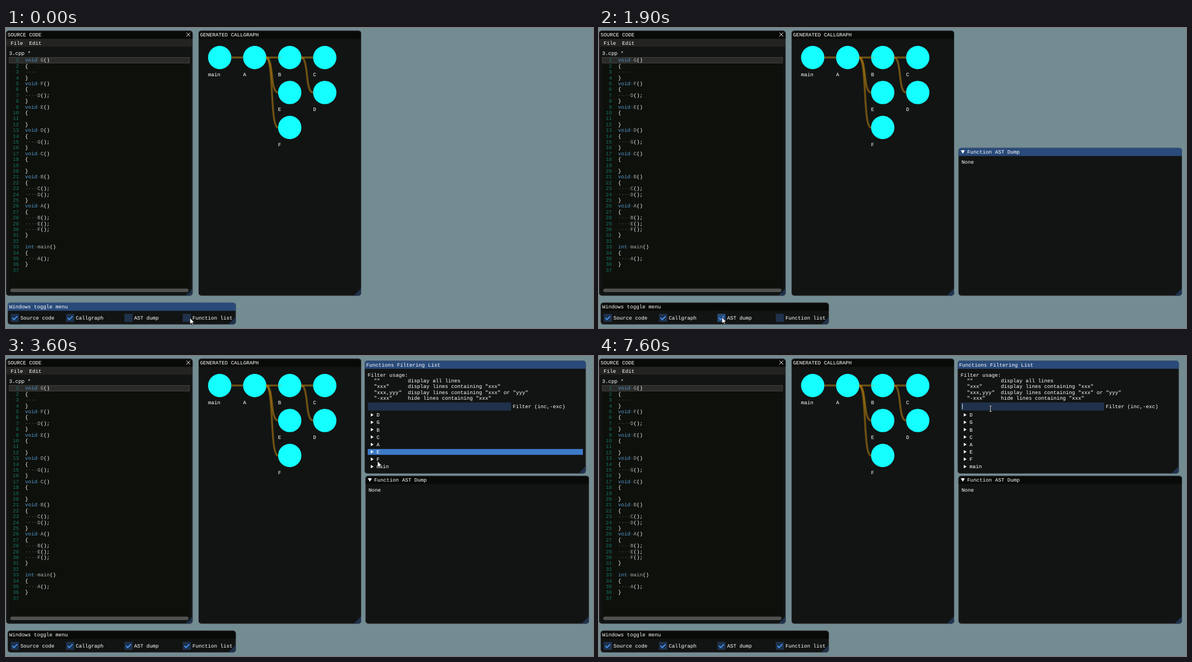
Recreate the animation shown at these times as an HTML page. Size 1046 px wide and 535 px high, loop 8 s.

```html
<!DOCTYPE html>
<html lang="en">
<head>
<meta charset="utf-8">
<title>Callgraph viewer</title>
<style>
html, body { margin: 0; width: 100%; height: 100%; overflow: hidden; background: #738c92; }
svg { display: block; width: 100%; height: 100%; }
text {
  font: 9.18px "Liberation Mono", monospace;
  fill: #fff;
  white-space: pre;
  text-rendering: geometricPrecision;
}
</style>
</head>
<body>
<svg id="stage" viewBox="0 0 1046 535"></svg>
<script>
const LOOP = 8000, STEP = 100;
const LINE = 10.4, CHAR = 5.508, TREE = 13.17;
const BG = '#121413', TITLE = '#080a07', TITLE_ON = '#294a7a';
const FRAME = '#1f314b', FRAME_ON = '#284c79', HOVER = '#3c7bc8';
const stage = document.getElementById('stage');

function add(parent, tag, attrs = {}, content) {
  const el = document.createElementNS('http://www.w3.org/2000/svg', tag);
  for (const k in attrs) el.setAttribute(k, attrs[k]);
  if (content !== undefined) el.textContent = content;
  parent.appendChild(el);
  return el;
}
const rect = (p, x, y, width, height, fill, more) =>
  add(p, 'rect', { x, y, width, height, fill, ...more });
const path = (p, d, fill, more) => add(p, 'path', { d, fill, ...more });
// y is the middle of the capital letters
const label = (p, x, y, str, more) => add(p, 'text', { x, y: y + 3, ...more }, str);
const show = (el, on) => el.setAttribute('visibility', on ? 'visible' : 'hidden');

// A panel with title bar, border and resize grip
function panel(x, y, w, h, title, indent = 2.8) {
  const g = add(stage, 'g'), r = 5, x2 = x + w, y2 = y + h;
  rect(g, x, y, w, h, BG, { rx: r });
  const bar = path(g, `M${x} ${y + 14.5}v${r - 14.5}a${r} ${r} 0 0 1 ${r} ${-r}H${x2 - r}a${r} ${r} 0 0 1 ${r} ${r}v${14.5 - r}z`, TITLE);
  path(g, `M${x2 - 13.5} ${y2}L${x2} ${y2 - 13.5}V${y2 - r}a${r} ${r} 0 0 1 ${-r} ${r}z`, FRAME);
  rect(g, x + .35, y + .35, w - .7, h - .7, 'none', { rx: r, stroke: '#6e6e80', 'stroke-opacity': .5, 'stroke-width': .7 });
  label(g, x + indent, y + 7.3, title);
  return { g, bar };
}

function buildSource() {
  const { g } = panel(0, 4.7, 332.6, 472.8, 'SOURCE CODE');
  path(g, 'M321.6 8.4l6.6 6.6m0 -6.6l-6.6 6.6', 'none', { stroke: '#fff', 'stroke-width': 1 });
  rect(g, .7, 19.3, 331.2, 14, '#232422');
  label(g, 8.3, 26.6, 'File');
  label(g, 41.2, 26.6, 'Edit');
  label(g, 5.5, 44.6, '3.cpp *');
  rect(g, 5.5, 52, 321.6, 420, '#0e100b');
  rect(g, 5.8, 52.4, 321.2, 10.2, '#2a2b29', { stroke: '#535452', 'stroke-width': .7 });
  rect(g, 7.5, 464.8, 317.8, 6.2, '#505150', { rx: 3 });

  const fn = (name, ...body) => [`void ${name}()`, '{', ...body, '}'];
  const call = name => `    ${name}();`;
  const code = [
    ...fn('G', '    '), ...fn('F', call('D')), ...fn('E', ''), ...fn('D', call('G')), ...fn('C', ''),
    ...fn('B', call('C'), call('D')), ...fn('A', call('B'), call('E'), call('F')),
    '', 'int main()', '{', call('A'), '}', ''
  ];
  code.forEach((src, i) => {
    const y = 57.4 + i * LINE;
    label(g, 23, y, i + 1, { 'text-anchor': 'end', style: 'fill:#14766c' });
    for (const m of src.matchAll(/\w+| |[^\w ]+/g)) {
      const x = 34 + m.index * CHAR, word = m[0];
      if (word === ' ') {
        path(g, `M${x + 1.9} ${y + .4}l.9 -.9l.9 .9l-.9 .9z`, '#585a56');
        continue;
      }
      const fill = /^(void|int)$/.test(word) ? '#569cd6' : /\w/.test(word) ? '#aaa' : '#fff';
      label(g, x, y, word, { style: `fill:${fill}` });
    }
  });
}

function buildGraph() {
  const { g } = panel(343, 4.7, 290, 472.8, 'GENERATED CALLGRAPH');
  const R = 20.8, GAP = 62.4;
  const nodes = { main: [0, 0], A: [1, 0], B: [2, 0], C: [3, 0], E: [2, 1], D: [3, 1], F: [2, 2] };
  const at = name => nodes[name].map((n, i) => [380.8, 52.6][i] + n * GAP);
  for (const name in nodes) {
    const [cx, cy] = at(name);
    add(g, 'circle', { cx, cy, r: R, fill: '#14ffff' });
    label(g, cx - R, cy + 30.1, name);
  }
  const brown = { stroke: '#c88c14', 'stroke-opacity': .5, 'stroke-width': 3.5 };
  for (const [a, b] of ['main A', 'A B', 'A E', 'A F', 'B C', 'B D'].map(s => s.split(' '))) {
    const [x1, y1] = at(a), [x2, y2] = at(b), bend = 15;
    const s = x1 + R - (y1 === y2 ? 0 : 1), e = x2 - R;
    path(g, `M${s} ${y1}C${s + bend} ${y1} ${e - bend} ${y2} ${e} ${y2}`, 'none', brown);
  }
  path(g, 'M485 52.6h6', 'none', { ...brown, 'stroke-width': 1.5 });
}

function buildToggles() {
  const { g, bar } = panel(2.9, 489.7, 406.7, 39, 'Windows toggle menu');
  const boxes = [[8.5, 'Source code'], [107, 'Callgraph'], [211, 'AST dump'], [315, 'Function list']].map(([x, name]) => {
    const box = rect(g, x, 509.7, 14.5, 14.5, FRAME);
    const tick = path(g, `M${x + 2.9} 517l2.9 2.9l5.8 -5.8`, 'none', { stroke: '#4296fa', 'stroke-width': 1.95 });
    label(g, x + 17.3, 517.2, name);
    return { box, tick };
  });
  return { bar, boxes };
}

function buildDump() {
  const win = panel(640.5, 213.7, 398.4, 263.8, 'Function AST Dump', 15.6);
  path(win.g, 'M644.7 218h7.2l-3.6 6.2z', '#fff');
  label(win.g, 646, 239.4, 'None');
  return win;
}

function buildList() {
  const win = panel(639, 8.2, 394.3, 201.5, 'Functions Filtering List'), { g } = win;
  const usage = [['""', 'all'], ['"xxx"', '"xxx"'], ['"xxx,yyy"', '"xxx" or "yyy"'], ['"-xxx"', '"xxx"']];
  label(g, 644.6, 33.6, 'Filter usage:');
  usage.forEach(([key, what], i) => {
    const verb = i === 3 ? 'hide' : 'display', y = 44 + i * LINE;
    label(g, 655.6, y, key);
    label(g, 716.1, y, i ? `${verb} lines containing ${what}` : 'display all lines');
  });
  rect(g, 644.6, 82.8, 255.5, 14.5, FRAME);
  label(g, 903, 90.2, 'Filter (inc,-exc)');
  win.caret = rect(g, 647.2, 85, .9, 9.8, '#fff');
  win.row = rect(g, 644.6, 0, 383.4, 10.4, HOVER);
  ['D', 'G', 'B', 'C', 'A', 'E', 'F', 'main'].forEach((name, i) => {
    const y = 105.2 + i * TREE;
    path(g, `M650 ${y - 3.2}v6l5 -3z`, '#fff');
    label(g, 660.2, y, name);
  });
  return win;
}

rect(stage, 0, 0, 1046, 535, '#738c92');
buildSource();
buildGraph();
const toggles = buildToggles(), dump = buildDump(), list = buildList();
const edge = { stroke: '#000', 'stroke-width': .7 };
const arrow = path(stage, 'M0 0V11.2L2.6 8.8L4.3 12.8L6 12L4.3 8.2H7.8z', '#fff', edge);
const beam = add(stage, 'g');
for (const [stroke, w] of [['#000', 2], ['#fff', .9]])
  path(beam, 'M-2 -4.8H2M0 -4.8V4.8M-2 4.8H2', 'none', { stroke, 'stroke-width': w });

// Pointer stops: time, x, y
const stops = [
  [0, 327.8, 517], [400, 325.5, 517], [500, 324.2, 517], [900, 322.6, 517],
  [1100, 308, 517], [1200, 272, 517], [1300, 244.5, 517], [1500, 232, 516.5],
  [1600, 222, 516], [1700, 219, 515.8],
  [2200, 240, 516], [2300, 295, 516.5], [2400, 322.8, 516.8],
  [3100, 331, 508], [3200, 385, 445], [3300, 470, 355], [3400, 560, 270],
  [3500, 625, 215], [3600, 662, 187.4], [3700, 682, 168], [3800, 696, 154], [3900, 702.5, 147],
  [4100, 701.5, 132], [4200, 700.5, 117], [4300, 699, 105], [4400, 698, 96], [4500, 697.8, 94.8], [4700, 697.6, 94]
];
const within = (t, a, b) => t >= a && t < b;

function draw(now) {
  const t = Math.floor(now % LOOP / STEP) * STEP;
  const [, x, y] = stops.findLast(s => s[0] <= t);
  const typing = t >= 4300;
  show(arrow, !typing);
  show(beam, typing);
  (typing ? beam : arrow).setAttribute('transform', `translate(${x} ${y})`);

  const dumpOn = t >= 1900, listOn = t >= 2900;
  show(dump.g, dumpOn);
  show(list.g, listOn);
  toggles.bar.setAttribute('fill', t < 1900 || within(t, 2800, 2900) ? TITLE_ON : TITLE);
  dump.bar.setAttribute('fill', within(t, 1900, 2800) ? TITLE_ON : TITLE);
  list.bar.setAttribute('fill', TITLE_ON);

  const [, , ast, fns] = toggles.boxes;
  show(ast.tick, dumpOn);
  show(fns.tick, listOn);
  ast.box.setAttribute('fill', within(t, 1600, 2200) ? FRAME_ON : FRAME);
  fns.box.setAttribute('fill', within(t, 2400, 3100) ? FRAME_ON : FRAME);

  const hot = within(t, 3600, 3700) ? 5 : within(t, 3700, 3800) ? 4 : -1;
  show(list.row, hot >= 0);
  list.row.setAttribute('y', 100 + hot * TREE);
  show(list.caret, within(t, 5000, 6000) || within(t, 6500, 7300) || t >= 7600);
}

const start = performance.now();
function tick() {
  draw(performance.now() - start);
  requestAnimationFrame(tick);
}
tick();
</script>
</body>
</html>
```
